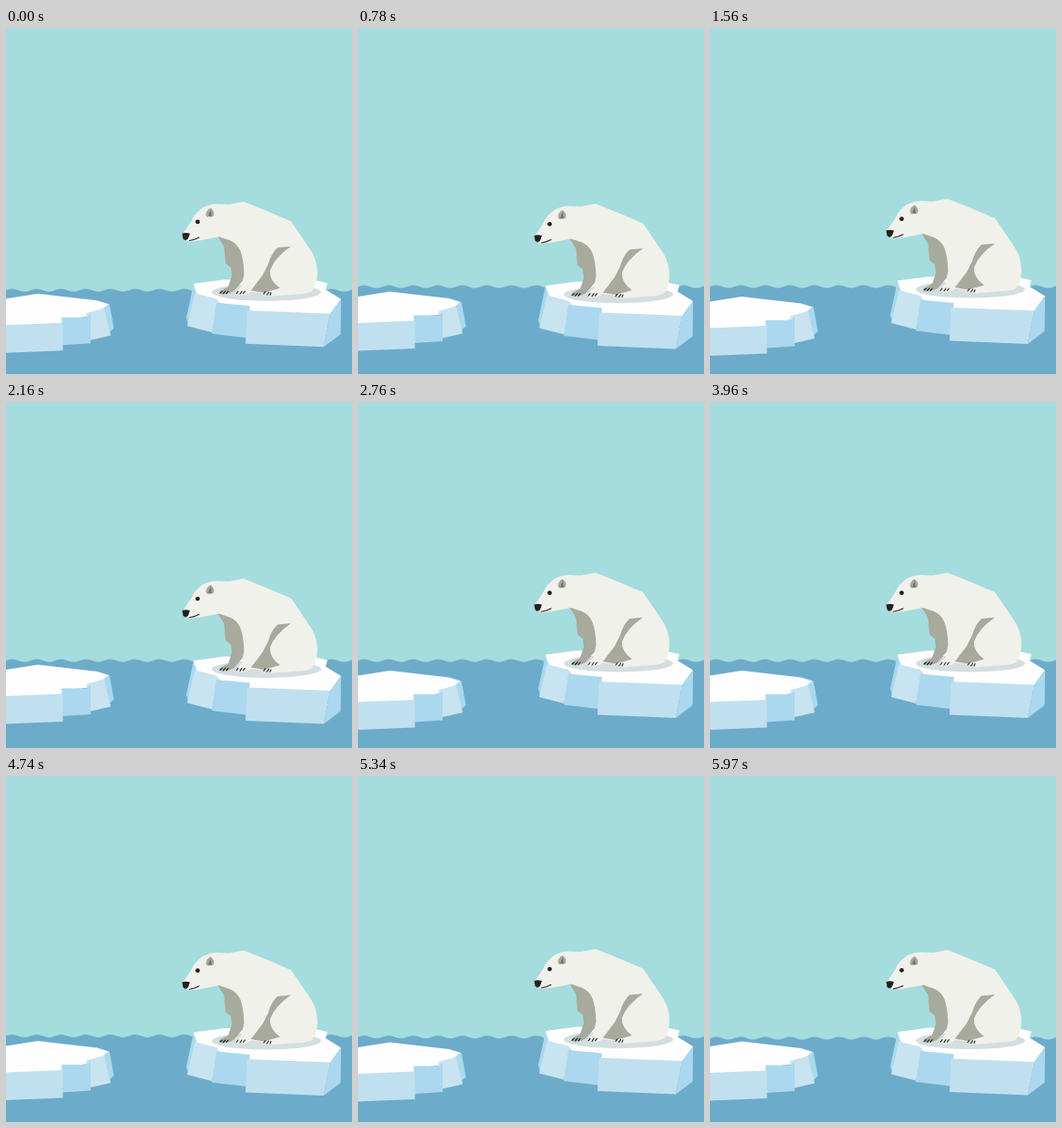
Write an HTML page that moves like this. It is 380 by 380 pixels and loops after 6000 ms.

```html
<!DOCTYPE html>
<html lang="en">
<head>
<meta charset="utf-8">
<title>Polar bear on the ice</title>
<style>
  html, body { margin: 0; width: 100%; height: 100%; overflow: hidden; background: #a5dcde; }
  svg { display: block; width: 100vw; height: 100vh; }
  .top { fill: #fefefe; }
  .front { fill: #c0e0f0; }
  .pale { fill: #c8e4f1; }
  .side { fill: #abd8ef; }
  .fur { fill: #f0f1eb; }
  .shade { fill: #a7aa9c; }
  .ink { fill: #23211f; }
  .line { fill: none; stroke: #23211f; stroke-width: 1.1; stroke-linecap: round; }
</style>
</head>
<body>
<svg viewBox="0 0 380 380">
  <rect width="380" height="380" fill="#a5dcde"/>
  <path id="sea" fill="#6dabca"/>

  <g id="left">
    <path class="top" d="M0 300.500L35 295L100 302.500L113 306.500L107 312L92 320L64 323L62 330L0 332Z"/>
    <path class="side" d="M106 311.500L113.500 306L118.500 333L113 338Z"/>
    <path class="pale" d="M88 316.500L107.500 311L115 341L93 346Z"/>
    <path class="side" d="M61 321L89 321L93 317V349.500L62 351.500Z"/>
    <path class="front" d="M0 329.500L62.500 327V357.500L0 360Z"/>
  </g>

  <g id="right">
    <path class="top" d="M206 277.500L240 273L340 274L353 277L351 284L368 294.500L356 311L265 311L232 304L207 290Z"/>
    <path class="side" d="M206 278L210 290L200 322L198 315Z"/>
    <path class="pale" d="M207.500 288L231 294L236 300L226 331L199 324Z"/>
    <path class="side" d="M231 298.500L268 302L264 337L226 332.500Z"/>
    <path class="front" d="M265 307L356 310.500L349 347L263 343.500Z"/>
    <path class="side" d="M356 310.500L368 294L367.500 333L349 347Z"/>
    <ellipse cx="286" cy="287" rx="60" ry="9.500" fill="#d3dee1"/>

    <path class="shade" d="M232 225L252 227L266 250L262 272L250 286Q243 290 236 289Q233 287 236 285L244 281L248 269L247 260L241 255L239.500 237Z"/>
    <path class="fur" d="M194 223L203.500 209Q206 202 213 196.500Q218 191 231 190L245 190.500L261 187.500L287 198L313 209L326 228L336 243Q342 254 342 266Q342 278 336 286Q331 288.500 322 289L294 291Q284 292 281 288L269 286.500Q264 291 255 290Q250 289 253 286L258.500 281L261.500 267Q261 250 257 240.500Q253 233 246 230L234 226L216 229.500L202 231.500L195 228.500Z"/>
    <path class="shade" d="M313 236.500L298 238Q291 245 288 256L282 268L269 285L283 287.500L301 282.500Q289 274 290 263Q295 249 313 236.500Z"/>
    <path class="shade" d="M219.500 202Q220 196 225 194.500Q229.500 198 228 203.500L221 204.500Z"/>
    <path d="M222 203L225 196L226 204Z" fill="#74756e"/>
    <circle class="ink" cx="210.500" cy="209.700" r="2.400"/>
    <path class="ink" d="M193.500 222.500Q197 221 202 222.500L200 228Q197 231.500 194.500 228Z"/>
    <path class="line" d="M201.500 230.300L207 229L212 226.800"/>
    <path class="line" d="M235 288L237.500 286M238.500 288.500L241 286M242 288.500L244 286M253 288.500L255 286M257 289L259 286M260.500 288.500L262.500 286M283 289L285 286.500M286.500 290L288.500 287M290 290L291 287.500"/>
  </g>
</svg>
<script>
  const LOOP = 6000, BOB = 1200, LIFT = 4;
  const sea = document.getElementById("sea");
  const left = document.getElementById("left");
  const right = document.getElementById("right");
  const tide = [[0, 288], [800, 284], [4000, 284], [6000, 288]];

  const ramp = t => 2 / Math.PI * Math.asin(Math.sin(2 * Math.PI * t / BOB));

  function level(t) {
    const i = tide.findIndex(p => p[0] > t);
    const [t0, y0] = tide[i - 1], [t1, y1] = tide[i];
    return y0 + (y1 - y0) * (t - t0) / (t1 - t0);
  }

  let d = "M0 400";
  for (let x = 0; x <= 380; x += 2) {
    d += `L${x} ${(-1.5 * Math.sin(2 * Math.PI * x / 27)).toFixed(2)}`;
  }
  sea.setAttribute("d", d + "L380 400Z");

  const shift = (part, y) => part.setAttribute("transform", `translate(0 ${y.toFixed(3)})`);

  function draw(now) {
    const t = now % LOOP;
    const dy = LIFT * (0.8 - ramp(t));
    shift(right, dy);
    shift(left, -dy);
    shift(sea, level(t));
    requestAnimationFrame(() => draw(performance.now()));
  }
  draw(0);
</script>
</body>
</html>
```
